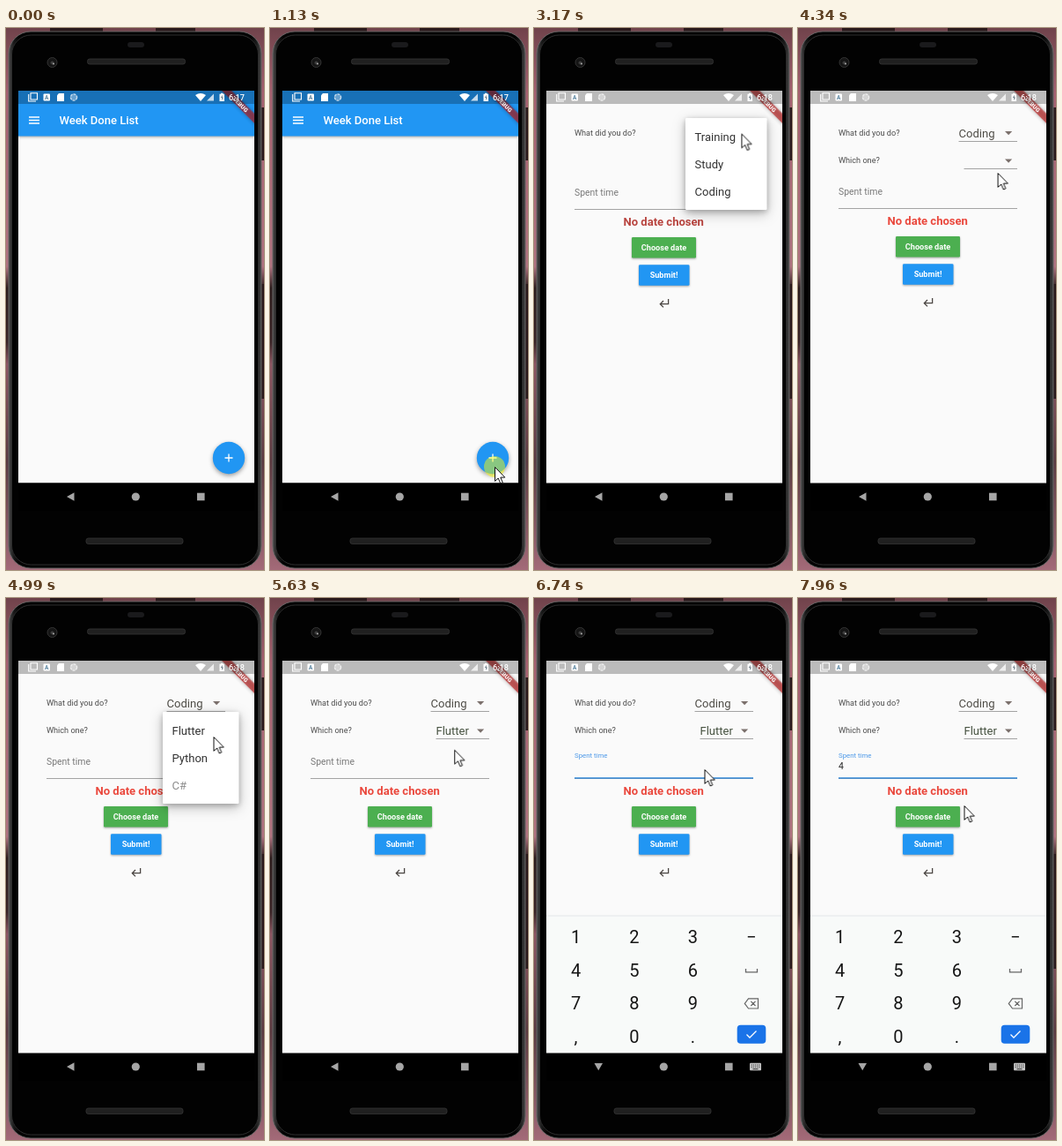
Write an HTML page that moves like this. It is 293 px wide and 614 px high and loops after 8 s.

```html
<!DOCTYPE html>
<html lang="en">
<head>
<meta charset="utf-8">
<title>Week Done List</title>
<style>
html, body { margin: 0; width: 100%; height: 100%; overflow: hidden; background: #000; }
svg { display: block; width: 293px; height: 614px; font-family: Roboto, sans-serif; }
.mid { font-weight: 500; }
.bold { font-weight: 700; }
.s9 { font-size: 9.13px; }
.s10 { font-size: 10.43px; }
.s13 { font-size: 13.04px; }
.raised { filter: drop-shadow(0 1px 1px rgba(0,0,0,.35)); }
.menu rect { fill: #fff; filter: drop-shadow(0 2px 3px rgba(0,0,0,.22)) drop-shadow(0 4px 7px rgba(0,0,0,.25)); }
.menu text { fill: #333; }
.line { stroke: #a3a3a3; stroke-width: 1; }
.thin { fill: none; stroke: #fff; stroke-width: 1.3; }
#keys { font-size: 20px; text-anchor: middle; }
</style>
</head>
<body>
<svg viewBox="0 0 293 614">
  <defs>
    <linearGradient id="photo" x2="0" y2="1">
      <stop offset="0" stop-color="#70434b"/><stop offset=".12" stop-color="#a5606f"/>
      <stop offset=".44" stop-color="#b07380"/><stop offset=".48" stop-color="#2c1c1c"/>
      <stop offset=".58" stop-color="#3a2426"/><stop offset=".62" stop-color="#8d5662"/>
      <stop offset=".8" stop-color="#5a3a40"/><stop offset="1" stop-color="#a36a78"/>
    </linearGradient>
    <linearGradient id="rim">
      <stop offset="0" stop-color="#4a4a4a"/><stop offset=".02" stop-color="#1b1b1b"/>
      <stop offset=".04" stop-color="#040404"/><stop offset=".96" stop-color="#040404"/>
      <stop offset=".98" stop-color="#1b1b1b"/><stop offset="1" stop-color="#444"/>
    </linearGradient>
    <clipPath id="screen"><path d="M14 71H282V515.5H14Z"/></clipPath>
    <clipPath id="display"><path d="M14 71H282V547H14Z"/></clipPath>
  </defs>

  <rect width="293" height="614" fill="url(#photo)"/>
  <path d="M50 0H110V6H50ZM170 0H215V6H170ZM288 90H293V150H288ZM288 290H293V420H288Z" fill="#2a191b"/>
  <rect x="3" y="4" width="287" height="608" rx="25" fill="url(#rim)" stroke="#6a6a6a" stroke-width=".9"/>
  <rect x="6.5" y="8" width="280" height="600" rx="22" fill="#020202" stroke="#2d2d2d"/>
  <rect x="138" y="16" width="19" height="6" rx="3" fill="#1a1a1c"/>
  <circle cx="52.5" cy="39" r="5.5" fill="#151515" stroke="#333"/>
  <circle cx="52.5" cy="39.5" r="2" fill="#3c3c3c"/>
  <circle cx="54" cy="40.5" r=".9" fill="#bbb"/>
  <g fill="#202020" stroke="#363636" stroke-width=".8">
    <rect x="92.5" y="35" width="111" height="6" rx="2.5"/>
    <rect x="91" y="578" width="110" height="6.5" rx="2.5"/>
  </g>
  <rect x="14" y="515" width="268" height="32"/>

  <g clip-path="url(#screen)">
    <rect x="14" y="71" width="268" height="445" fill="#fafafa"/>
    <rect x="14" y="71" width="268" height="51.5" fill="#2196f3" style="filter:drop-shadow(0 1px 1.5px rgba(0,0,0,.35))"/>
    <path class="thin" d="M26 101H38M26 104.5H38M26 108H38"/>
    <text class="s13 mid" x="60.5" y="109" fill="#fff">Week Done List</text>
    <circle cx="253" cy="487" r="18.2" fill="#2196f3" style="filter:drop-shadow(0 2px 2.5px rgba(0,0,0,.38))"/>
    <path class="thin" d="M248.5 487H257.5M253 482.5V491.5"/>

    <g id="page">
      <rect x="14" y="71" width="268" height="446" fill="#fafafa"/>
      <text class="s9" x="46" y="122" fill="#4c4c4c">What did you do?</text>
      <path class="line" d="M182.5 128.5H249"/>
      <path d="M235 117H243.2L239.1 121.2Z" fill="#7b706c"/>
      <text id="task" class="s13" x="182.5" y="124" fill="#4e4c46">Coding</text>
      <g id="which">
        <text class="s9" x="46" y="153" fill="#4c4c4c">Which one?</text>
        <path class="line" d="M188.5 159.5H249"/>
        <path d="M235 148.5H243.2L239.1 152.7Z" fill="#7b706c"/>
        <text id="kind" class="s13" x="188.5" y="155" fill="#465240">Flutter</text>
      </g>
      <g id="low">
        <g id="label"><text class="s10">Spent time</text></g>
        <text id="typed" class="s10" x="46" y="194.5" fill="#222">4</text>
        <path class="line" d="M46 205.5H249"/>
        <path id="focus" d="M46 205H249" stroke="#2f86d6" stroke-width="1.6"/>
        <path id="caret" d="M46.6 186V196" stroke="#2f7fe0" stroke-width="1.3"/>
        <text id="warn" class="s13 bold" x="101.5" y="224">No date chosen</text>
        <g class="raised">
          <rect x="111" y="237" width="73" height="23.5" rx="1.3" fill="#4caf50"/>
          <rect x="119" y="268.3" width="57.5" height="23.5" rx="1.3" fill="#2196f3"/>
        </g>
        <g class="s9 bold" fill="#fff" text-anchor="middle">
          <text x="147.5" y="252">Choose date</text>
          <text x="147.5" y="283.4">Submit!</text>
        </g>
        <path d="M152.6 307V312.7H143.5M147 309L143.3 312.7L147 316.4" fill="none" stroke="#4a4542" stroke-width="1.3"/>
      </g>
    </g>

    <g id="menus"></g>

    <g transform="translate(282 71) rotate(45)">
      <rect x="-40" y="18.3" width="80" height="7.8" fill="#b71c1c" fill-opacity=".66" style="filter:drop-shadow(0 0 2px rgba(0,0,0,.45))"/>
      <text y="24.6" font-size="6.6" font-weight="900" fill="#fff" text-anchor="middle">DEBUG</text>
    </g>

    <rect x="14" y="71" width="268" height="15" fill="#000" fill-opacity=".25"/>
    <g fill="#fff">
      <path d="M25.7 75V83H34M28 73.8H35.5V81H28Z" fill="none" stroke="#fff" stroke-width="1.1"/>
      <rect x="42.5" y="74.5" width="7.5" height="8" rx="1"/>
      <path d="M60 74H66V83H58V76.2Z"/>
      <circle cx="77" cy="78.5" r="3.6" fill="#fff" fill-opacity=".35" stroke="#fff" stroke-opacity=".7" stroke-width="1.4" stroke-dasharray="3 1"/>
      <path d="M215 76Q221 71.8 227 76L221 83Z"/>
      <path d="M236 74.5V82.5H228Z" fill-opacity=".75"/>
      <path d="M242.5 74.8H244V73.8H246.5V74.8H248V83H242.5Z"/>
      <text x="46.3" y="81" font-size="6.5" font-weight="700" fill="#58839f" text-anchor="middle">A</text>
      <path d="M245.8 75.7L243.8 79H245.1V82L247 78.5H245.7Z" fill="#6d7d88"/>
      <g class="s9 mid">
        <text id="early" x="253" y="81.7">6:17</text>
        <text id="late" x="253" y="81.7">6:18</text>
      </g>
    </g>
  </g>

  <g clip-path="url(#display)">
    <g id="board">
      <rect x="14" y="359" width="268" height="190" fill="#eef0f1"/>
      <rect x="14" y="361" width="268" height="188" fill="#f8faf9"/>
      <g id="keys"></g>
      <path d="M240.5 420V423.8H253.5V420" fill="none" stroke="#666" stroke-width="1.3"/>
      <path d="M243.5 453.8H254.5V465H243.5L239.3 459.4ZM246.3 456.8L251.5 462M251.5 456.8L246.3 462" fill="none" stroke="#666" stroke-width="1.2"/>
      <rect x="230.7" y="483.8" width="32.6" height="21" rx="4" fill="#1a73e8"/>
      <path class="thin" d="M241.5 494.5L245 498L252.5 490.5"/>
    </g>
  </g>
  <rect id="nav" x="14" y="515.5" width="268" height="31.5"/>
  <g fill="#a6a6a6">
    <path id="back" d="M77.5 526.3V535.7L69 531Z"/>
    <path id="hide" d="M68.5 527H78L73.2 535.3Z"/>
    <circle cx="147.3" cy="531" r="4.6"/>
    <rect x="217" y="526.7" width="8.6" height="8.6"/>
    <g id="ime">
      <rect x="245" y="526.7" width="13" height="8.6" rx="1" fill="#c4c4c4"/>
      <path d="M246.5 529H256.5M246.5 531.2H256.5" stroke="#333" stroke-width="1.1" stroke-dasharray="1.2 1"/>
      <path d="M248.5 533.6H254.5" stroke="#333"/>
    </g>
  </g>

  <g id="pointer">
    <circle id="ring" r="12" fill="#ff0" fill-opacity=".47"/>
    <path d="M.5 .5V16.4L4.2 13L6.8 19L9.3 17.9L6.8 12.1H11.8Z" fill="#fff" stroke="#111" stroke-width="1"/>
  </g>
</svg>
<script>
const LOOP = 8000, HARD = 'steps(1, end)';
const $ = id => document.getElementById(id);
const move = (x, y) => `translate(${x}px, ${y}px)`;

// steps: [time, value, easing to the next step]; the first one is at 0
function play(el, prop, steps, easing = HARD) {
  const all = [...steps, [LOOP, steps[steps.length - 1][1]]];
  el.animate(all.map(([t, value, ease = easing]) => ({ offset: t / LOOP, [prop]: value, easing: ease })),
    { duration: LOOP, iterations: Infinity });
}
const fade = (el, ...steps) => play(el, 'opacity', [[0, 0], ...steps], 'linear');
const show = (id, ...times) =>
  play($(id), 'opacity', [[0, 0], ...times.map((t, i) => [t, 1 - i % 2])]);

function add(parent, tag, attrs, text = '') {
  const el = document.createElementNS('http://www.w3.org/2000/svg', tag);
  for (const key in attrs) el.setAttribute(key, attrs[key]);
  el.textContent = text;
  return parent.appendChild(el);
}

function menu(x, y, items, open, close) {
  const g = add($('menus'), 'g', { class: 'menu s13' });
  const back = add(g, 'rect', { x, y, width: 264.5 - x, height: 104, rx: 1.3 });
  back.style.transformOrigin = `0 ${y}px`;
  fade(g, [open, 0], [open + 70, 1], [close, 1], [close + 120, 0]);
  play(back, 'transform', [[0, 'scaleY(.3)'], [open + 60, 'scaleY(.3)'], [open + 150, 'scaleY(1)']], 'ease-out');
  items.forEach((name, i) => {
    const text = add(g, 'text', { x: x + 10.5, y: y + 25.5 + 31.3 * i }, name);
    const start = open + 80 + 40 * i;
    fade(text, [start, 0], [start + 90, 1]);
  });
}
menu(172, 102, ['Training', 'Study', 'Coding'], 2910, 3920);
menu(178, 129, ['Flutter', 'Python', 'C#'], 4780, 5400);

['123−', '456', '789', ',0.'].forEach((row, r) => [...row].forEach((key, c) =>
  add($('keys'), 'text', { x: 47.5 + 66.4 * c, y: 391 + 37.7 * r }, key)));

// new page
fade($('page'), [1560, 0, 'ease-in'], [1830, 1]);
play($('page'), 'transform', [[0, move(0, 111)], [1560, move(0, 111), 'cubic-bezier(.4, 0, .2, 1)'], [1850, move(0, 0)]]);

// form
show('late', 2560);
play($('early'), 'opacity', [[0, 1], [2560, 0]]);
show('task', 3920);
show('which', 3920);
show('kind', 5400);
play($('low'), 'transform', [[0, move(0, 0)], [3920, move(0, -1)]]);
play($('warn'), 'fill', [[0, '#b8443f'], [3920, '#ea483d']]);

// text field
const rest = move(46, 189.5) + ' scale(1)';
play($('label'), 'transform', [[0, rest], [6290, rest, 'ease-out'], [6490, move(46, 181.5) + ' scale(.75)']]);
play($('label'), 'fill', [[0, '#7a7a7a'], [6290, '#7a7a7a', 'linear'], [6490, '#4b98e8']]);
fade($('focus'), [6290, 0], [6490, 1]);
show('caret', 6160, 6740, 7210, 7800);
play($('caret'), 'transform', [[0, move(0, 0)], [7440, move(6.5, 0)]]);
show('typed', 7440);

// keyboard and navigation bar
fade($('board'), [6120, 0], [6180, 1]);
play($('board'), 'transform', [[0, move(0, 110)], [6120, move(0, 110)], [6280, move(0, 46)],
  [6400, move(0, 10)], [6500, move(0, 0)]], 'linear');
play($('keys'), 'fill', [[0, '#aaa'], [6120, '#aaa'], [6280, '#7c7c7c'], [6500, '#161616']], 'linear');
play($('nav'), 'opacity', [[0, 1], [6140, .5], [6490, 1]]);
play($('back'), 'opacity', [[0, 1], [6140, 0]]);
show('hide', 6140);
show('ime', 6140);

// mouse
show('ring', 1130, 1270, 2710, 2850, 3640, 3780, 4570, 4700, 5170, 5310, 5870, 6000);
const path = [
  [0, 272, 616], [140, 271, 610], [400, 264, 545], [760, 255, 497],
  [1560, 255, 497], [1730, 242, 440], [1870, 221, 378], [2120, 228, 235], [2380, 235, 138], [2520, 235, 119.5],
  [3350, 235.5, 119.5], [3600, 236, 186], [4060, 236, 186], [4340, 226.5, 164], [4430, 229, 161], [4560, 235.5, 157],
  [5400, 235.5, 157], [5730, 198, 178], [5860, 194, 190], [6140, 194, 190], [6240, 193.5, 194],
  [7440, 193.5, 194], [7700, 190, 220], [7950, 188.5, 235]
];
play($('pointer'), 'transform', path.map(([t, x, y]) => [t, move(x, y)]), 'linear');
</script>
</body>
</html>
```
